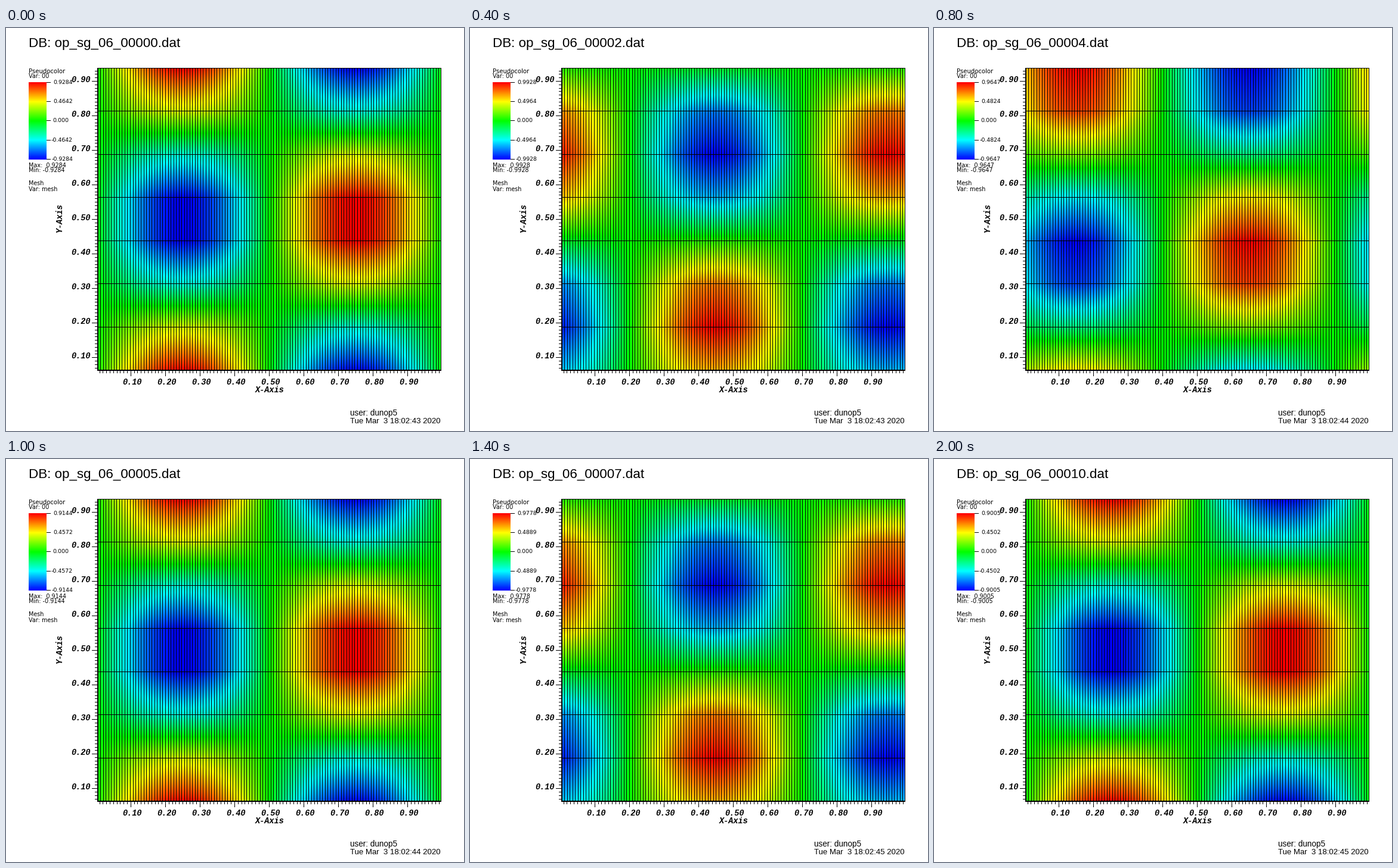
A matplotlib script that plays this animation: 768 px wide and 677 px high, repeating every 2200 ms.

```python
import numpy as np
import matplotlib.pyplot as plt
from matplotlib.animation import FuncAnimation

W, H, DPI = 768, 677, 64
FRAMES, STEP_MS = 11, 200
X0, X1 = 0.2 * W, 0.95 * W                 # viewport edges, y measured downwards
Y0, Y1 = 0.85 * H, 0.1 * H
LEFT, RIGHT, TOP, BOTTOM = (int(v) for v in (X0, X1, Y1, Y0))
NX, NY = 128, 8
PEAKS = (0.92843, 0.9668, 0.99284, 0.9896, 0.9647)
DECAY = 0.98484                            # amplitude loss per half period

STOPS = np.linspace(-1, 1, 5)
RAMP = np.array([(0, 0, 1), (0, 1, 1), (0, 1, 0), (1, 1, 0), (1, 0, 0)])


def colorize(v):
    return np.stack([np.interp(v, STOPS, RAMP[:, c]) for c in range(3)], axis=-1)


x_nodes = (np.arange(NX) + 0.5) / NX
y_nodes = (np.arange(NY) + 0.5) / NY
x_ends, y_ends = x_nodes[[0, -1]], y_nodes[[0, -1]]
x_unit = (X1 - X0) / np.ptp(x_ends)
y_unit = (Y0 - Y1) / np.ptp(y_ends)


def to_px(x):
    return X0 + (x - x_ends[0]) * x_unit


def to_py(y):
    return Y0 - (y - y_ends[0]) * y_unit


# Axis coordinates at the pixel centres of the plot area.
x_pix = x_ends[0] + (np.arange(LEFT, RIGHT + 1) + 0.5 - X0) / x_unit
y_pix = y_ends[0] + (Y0 - np.arange(TOP, BOTTOM + 1) - 0.5) / y_unit
x_lines = np.floor(to_px(x_nodes) + 0.5).astype(int) - LEFT
x_lines = x_lines[x_lines <= RIGHT - LEFT]
y_lines = np.floor(to_py(y_nodes) - 0.5).astype(int) - TOP


def plot_pixels(k):
    wave_x = np.sin(2 * np.pi * (x_nodes - 0.1 * k))
    wave_y = np.cos(2 * np.pi * (y_nodes - 0.1 * k))
    wave_x /= np.abs(wave_x).max()
    wave_y /= np.abs(wave_y).max()
    field = np.outer(np.interp(y_pix, y_nodes, wave_y),
                     np.interp(x_pix, x_nodes, wave_x))
    rgb = colorize(field)
    rgb[:, x_lines] = 0
    rgb[y_lines] = 0
    rgb[[0, -1]] = 0
    rgb[:, [0, -1]] = 0
    return rgb


def backdrop():
    img = np.ones((H, W, 3))
    img[91:221, 38:68] = colorize(np.linspace(1, -1, 130))[:, None]
    for i in range(5):
        img[91 + round(i * 32.25), 68:75] = 0
    for i in range(1, 100):
        major = i % 10 == 0
        x, y = int(to_px(i / 100)), int(to_py(i / 100))
        if LEFT <= x <= RIGHT:
            img[BOTTOM:BOTTOM + (10 if major else 5), x] = 0
        if TOP <= y <= BOTTOM:
            img[y, LEFT - (9 if major else 4):LEFT] = 0
    return img


fig = plt.figure(figsize=(W / DPI, H / DPI), dpi=DPI, facecolor="white")
ax = fig.add_axes([0, 0, 1, 1])
ax.axis("off")
base = backdrop()
picture = ax.imshow(base, extent=(0, W, H, 0), interpolation="nearest",
                    aspect="auto")
ax.set_xlim(0, W)
ax.set_ylim(H, 0)


def label(x, y, s, px, font="Liberation Sans", **kw):
    kw.setdefault("va", "baseline")
    return ax.text(x, y, s, fontsize=px * 72 / DPI, family=font,
                   color="black", **kw)


def legend(x, y, s, px=9.6, **kw):
    return label(x, y, s, px, "DejaVu Sans", **kw)


def axis_text(x, y, s, **kw):
    return label(x, y, s, 13.6, "Liberation Mono", weight="bold",
                 style="italic", ha="center", **kw)


title = label(38, 32, "", 22.35)
legend(38, 75.5, "Pseudocolor", 10.1)
legend(38, 84.5, "Var: 00")
scale = [legend(112, 93.5 + i * 32.4, "", 9.4, ha="right") for i in range(5)]
scale[2].set_x(105.5)
scale[2].set_text("0.000")
top_text = legend(38, 233.5, "")
low_text = legend(38, 242.5, "")
legend(38, 264.5, "Mesh")
legend(38, 273.5, "Var: mesh")

for i in range(1, 10):
    name = f"{i / 10:.2f}"
    axis_text(211 + 58.06 * (i - 1), 599, name)
    axis_text(125.5, 555 - 58.06 * (i - 1), name)
axis_text(442, 612, "X-Axis")
axis_text(90, 319, "Y-Axis", rotation=90, va="center")

label(577, 651, "user: dunop5", 13.5)
stamp = label(577, 664.3, "", 13.2)


def update(k):
    img = base.copy()
    img[TOP:BOTTOM + 1, LEFT:RIGHT + 1] = plot_pixels(k)
    picture.set_data(img)

    peak = PEAKS[k % 5] * DECAY ** (k // 5)
    for i, part in ((0, 1), (1, 0.5), (3, -0.5), (4, -1)):
        scale[i].set_text(f"{peak * part:.4f}")
    top_text.set_text(f"Max:  {peak:.4f}")
    low_text.set_text(f"Min: {-peak:.4f}")
    title.set_text(f"DB: op_sg_06_{k:05d}.dat")
    second = 43 + (k >= 4) + (k >= 7)
    stamp.set_text(f"Tue Mar  3 18:02:{second} 2020")
    return [picture, title, stamp, top_text, low_text, *scale]


anim = FuncAnimation(fig, update, frames=FRAMES, interval=STEP_MS,
                     repeat=True, repeat_delay=0, blit=False)
plt.show()
```
